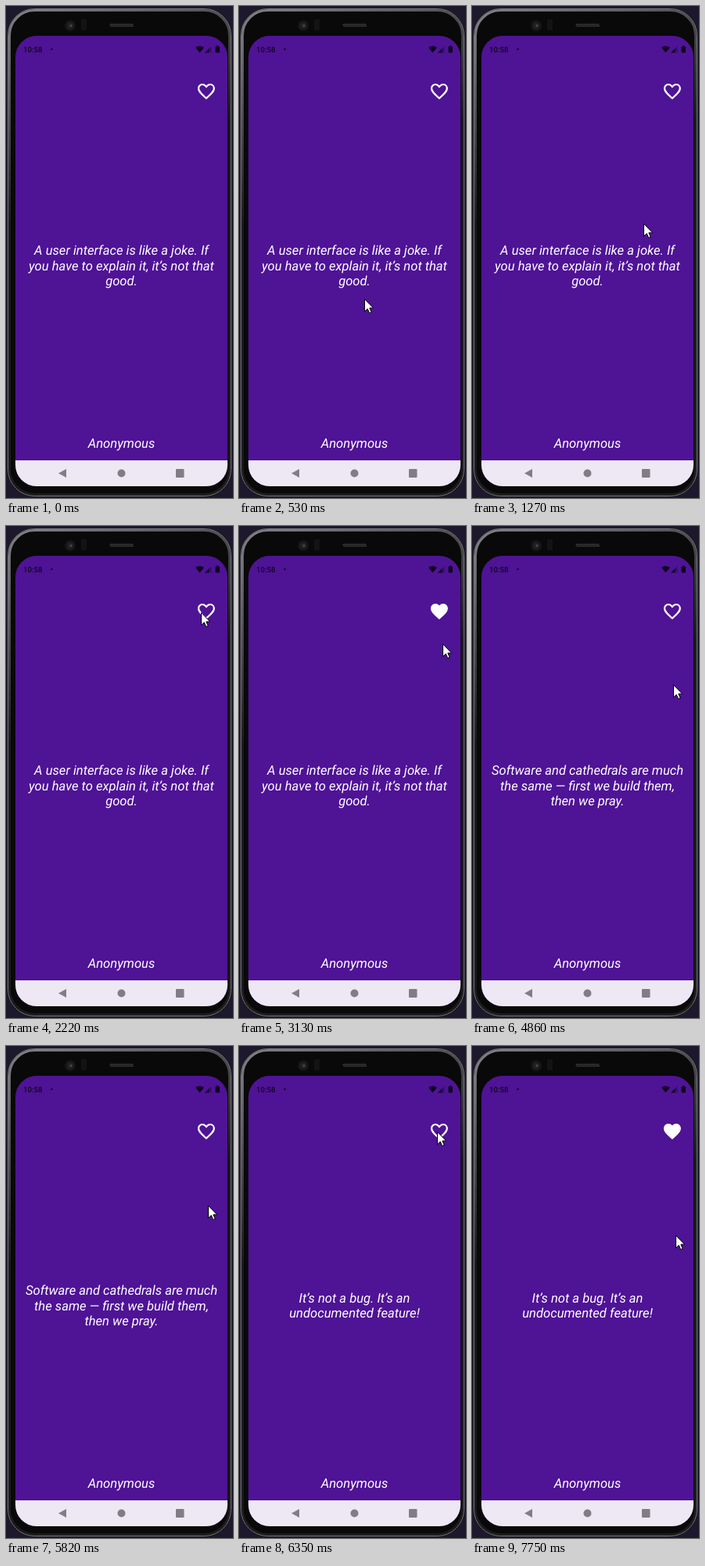
Write an HTML page with a canvas that moves like this. It is 290 px wide and 627 px high and loops after 8000 ms.

```html
<!DOCTYPE html>
<html lang="en">
<head>
<meta charset="utf-8">
<title>Quotes</title>
<style>
html, body { margin: 0; width: 100%; height: 100%; overflow: hidden; background: #1d182b; }
canvas { display: block; width: 290px; height: 627px; }
</style>
</head>
<body>
<canvas id="stage" width="290" height="627"></canvas>
<script>
const ctx = document.getElementById('stage').getContext('2d');
const LOOP = 8000, STEP = 68;
const PURPLE = '#4f1396', INK = '#100620';

const quotes = [
  { from: 0, lines: ['A user interface is like a joke. If', 'you have to explain it, it’s not that', 'good.'] },
  { from: 4200, lines: ['Software and cathedrals are much', 'the same — first we build them,', 'then we pray.'] },
  { from: 5890, lines: ['It’s not a bug. It’s an', 'undocumented feature!'] }
];
const liked = t => (t >= 2960 && t < 4200) || t >= 7290;
const pressed = t => [2620, 4000, 5600, 7030].some(at => t >= at && t < at + 140);

// The pointer glides from one resting place to the next, some glides bent by "via"
const entry = [187, 474];
const glides = [
  { from: 260, until: 810, to: [219, 289], via: [110, 395] },
  { from: 1270, until: 1550, to: [278, 110], via: [214, 235] },
  { from: 1620, until: 1830, to: [245, 110], via: [270, 45] },
  { from: 2090, until: 2220, to: [251, 110] },
  { from: 2960, until: 3470, to: [259, 167], via: [272, 205] },
  { from: 3670, until: 3810, to: [251, 219] },
  { from: 4530, until: 4600, to: [254, 209] },
  { from: 4860, until: 4860, to: [257, 202] },
  { from: 4930, until: 5140, to: [258, 203], via: [257, 93] },
  { from: 6050, until: 6120, to: [260, 80] },
  { from: 6280, until: 6350, to: [253, 109] },
  { from: 7290, until: 7420, to: [274, 218] },
  { from: 7680, until: 7750, to: [260, 241] }
];

const heart = new Path2D('M12 21.35C6 16 2 12.7 2 8.5 2 5.4 4.4 3 7.5 3Q10.2 3 12 5.1 13.8 3 16.5 3C19.6 3 22 5.4 22 8.5 22 12.7 18 16 12 21.35Z');
const arrow = new Path2D('M.5.6V16.3L4.2 12.8 6.7 18.4 9.2 17.3 6.8 11.9H11.6Z');

function fill(color, draw) {
  ctx.fillStyle = color;
  ctx.beginPath();
  draw();
  ctx.fill();
}
const box = (x, y, w, h, r, color) => fill(color, () => ctx.roundRect(x, y, w, h, r));
const disc = (x, y, r, color) => fill(color, () => ctx.arc(x, y, r, 0, Math.PI * 2));
const poly = (color, ...pts) => fill(color, () => pts.forEach(p => ctx.lineTo(...p)));

// Rounded frame inset from the stage edges
function rim(inset, r, width, color) {
  ctx.strokeStyle = color;
  ctx.lineWidth = width;
  ctx.beginPath();
  ctx.roundRect(inset, inset + 1, 290 - 2 * inset, 626 - 2 * inset, r);
  ctx.stroke();
}

function text(str, x, y, font, color, align) {
  ctx.font = font;
  ctx.textRendering = 'geometricPrecision';
  ctx.fillStyle = color;
  ctx.textAlign = align;
  ctx.fillText(str, x, y);
}

function pointerAt(t) {
  const i = glides.findLastIndex(g => t >= g.from);
  if (i < 0) return null;
  const { from, until, to, via } = glides[i];
  const start = i ? glides[i - 1].to : entry;
  const count = Math.round((until - from) / STEP) + 1;
  const u = Math.min(1, (Math.floor((t - from) / STEP + 0.05) + 1) / count);
  const e = u * u * (3 - 2 * u);
  return start.map((a, d) => {
    const mid = via ? via[d] : (a + to[d]) / 2;
    return Math.round(a * (1 - e) ** 2 + 2 * mid * e * (1 - e) + to[d] * e * e);
  });
}

function drawPhone() {
  ctx.fillStyle = '#1d182b';
  ctx.fillRect(0, 0, 290, 627);
  box(2, 3, 286, 622, 34, '#090909');

  const shine = ctx.createLinearGradient(0, 0, 110, 230);
  shine.addColorStop(0, '#858588');
  shine.addColorStop(1, '#1c1c1d');
  rim(4.5, 32, 3, shine);
  rim(2.5, 34, 1, '#78787b');

  disc(82, 25, 7, '#161617');
  disc(82, 25, 4, '#222224');
  disc(83, 25, 1.5, '#4a4a4e');
  box(96, 17, 7, 14, 1, '#131313');
  box(132, 22, 31, 5, 2, '#161616');
  for (let x = 133; x < 162; x += 2) {
    box(x, 23, 1, 1, 0, '#58585a');
    box(x + 1, 25, 1, 1, 0, '#58585a');
  }
}

function drawStatus() {
  text('10:58', 22, 59, '500 9.7px Roboto, sans-serif', INK, 'left');
  disc(58.5, 55, 1.3, INK);
  fill(INK, () => {
    ctx.moveTo(247.5, 59.5);
    ctx.lineTo(242, 53);
    ctx.quadraticCurveTo(247.5, 48.8, 253, 53);
  });
  poly('#36106b', [262.5, 51], [262.5, 59.5], [254, 59.5]);
  poly(INK, [259.5, 54], [259.5, 59.5], [254, 59.5]);
  box(267.5, 51.5, 5.5, 8, 1, INK);
  box(269, 50.5, 2.5, 2, 0, INK);
}

function drawNav() {
  ctx.fillStyle = '#eee7f4';
  ctx.fillRect(12, 579, 271, 33);
  const grey = '#817d86';
  poly(grey, [67, 595.5], [77, 590], [77, 601]);
  disc(147.5, 595.5, 5, grey);
  box(217, 590, 10.5, 11, 1, grey);
}

function drawHeart(full) {
  ctx.save();
  ctx.translate(242.7, 95.6);
  ctx.scale(1.098, 1.098);
  if (full) {
    ctx.fillStyle = '#fff';
    ctx.fill(heart);
  } else {
    ctx.clip(heart);
    ctx.strokeStyle = '#fff';
    ctx.lineWidth = 4;
    ctx.stroke(heart);
  }
  ctx.restore();
}

function drawQuote(t) {
  const font = 'italic 400 16.6px Roboto, sans-serif';
  const { lines } = quotes.findLast(q => t >= q.from);
  const top = 336.5 - (lines.length - 1) * 9.75;
  lines.forEach((line, i) => text(line, 147.5, top + i * 19.5, font, '#fff', 'center'));
  text('Anonymous', 147.5, 563, font, '#fff', 'center');
}

function drawPointer(t) {
  const pos = pointerAt(t);
  if (!pos) return;
  if (pressed(t)) disc(...pos, 12, 'rgba(255,255,0,.47)');
  ctx.save();
  ctx.translate(...pos);
  ctx.fillStyle = '#fff';
  ctx.strokeStyle = '#000';
  ctx.lineWidth = 1;
  ctx.fill(arrow);
  ctx.stroke(arrow);
  ctx.restore();
}

function render(t) {
  drawPhone();
  ctx.save();
  ctx.beginPath();
  ctx.roundRect(12, 38, 271, 574, 27);
  ctx.clip();
  ctx.fillStyle = PURPLE;
  ctx.fillRect(12, 38, 271, 574);
  drawStatus();
  drawNav();
  drawHeart(liked(t));
  drawQuote(t);
  ctx.restore();
  drawPointer(t);
}

const begin = performance.now();
function tick() {
  render((performance.now() - begin) % LOOP);
  requestAnimationFrame(tick);
}
tick();
</script>
</body>
</html>
```
